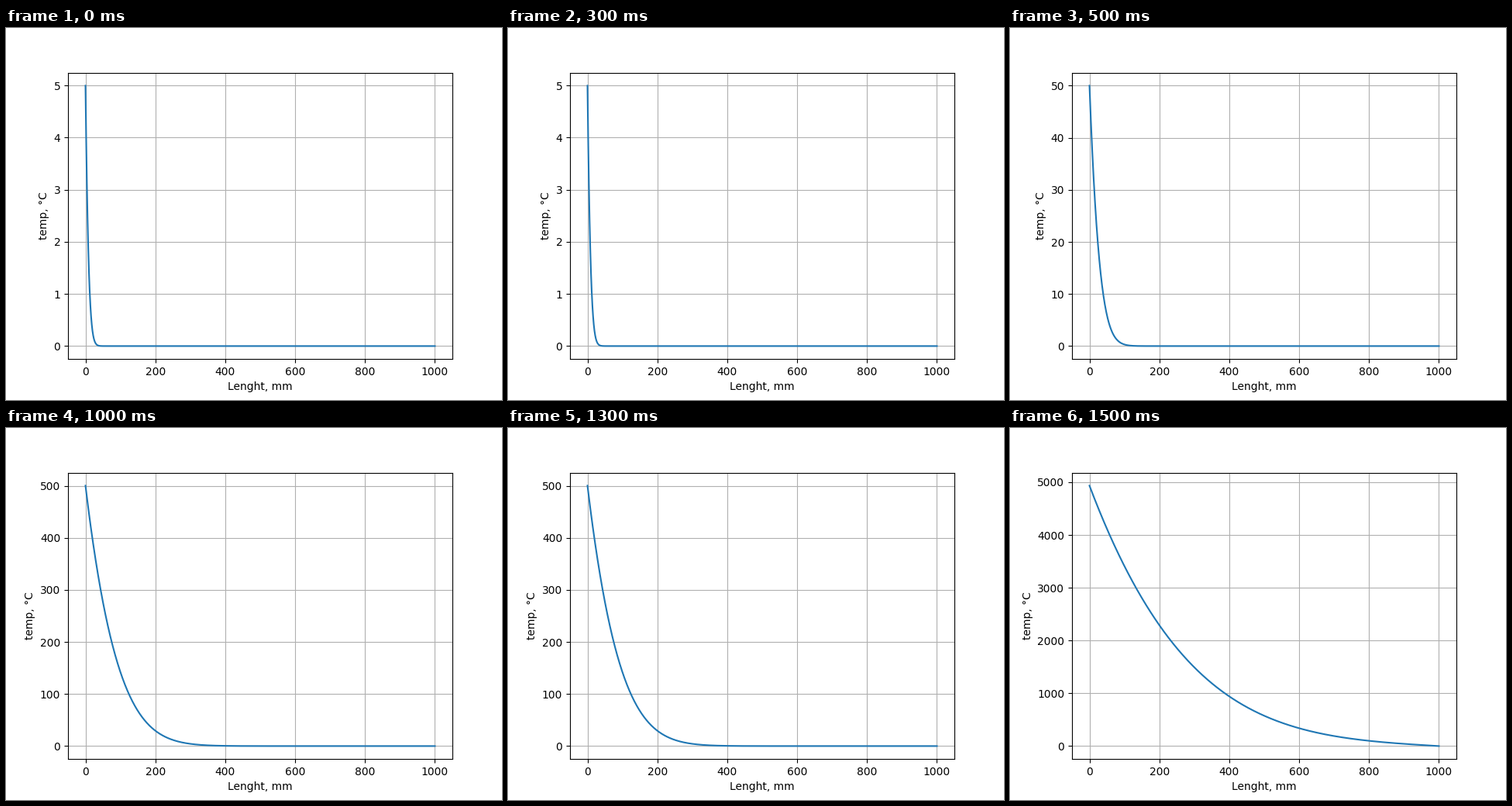
Animation of 640 by 480 pixels, one loop 2000 ms. Source, as a matplotlib script:

```python
import math

import numpy as np
import matplotlib.pyplot as plt
from matplotlib.animation import FuncAnimation

LENGTH = 1000        # bar length, mm
DIFFUSIVITY = 20.4   # mm^2/s
TIMES = (4.995, 50, 500.2, 4935)  # s; the hot end warms by 1 degree per second

erfc = np.vectorize(math.erfc)


def ramp(x, t):
    """Temperature in a half-space whose surface warms linearly with time."""
    u = x / (2 * math.sqrt(DIFFUSIVITY * t))
    return t * ((1 + 2 * u**2) * erfc(u) - 2 * u / math.sqrt(math.pi) * np.exp(-u**2))


def temperature(x, t):
    """Mirror term keeps the far end at zero."""
    return ramp(x, t) - ramp(2 * LENGTH - x, t)


fig, ax = plt.subplots(figsize=(6.4, 4.8), dpi=100)
x = np.linspace(0, LENGTH, LENGTH + 1)
line, = ax.plot(x, temperature(x, TIMES[0]))
ax.set_xlabel("Lenght, mm")
ax.set_ylabel("temp, °C")
ax.grid()


def update(i):
    temp = temperature(x, TIMES[i])
    line.set_ydata(temp)
    margin = 0.05 * temp[0]
    ax.set_ylim(-margin, temp[0] + margin)
    return line,


anim = FuncAnimation(fig, update, frames=len(TIMES), interval=500, repeat=True)
plt.show()
```
